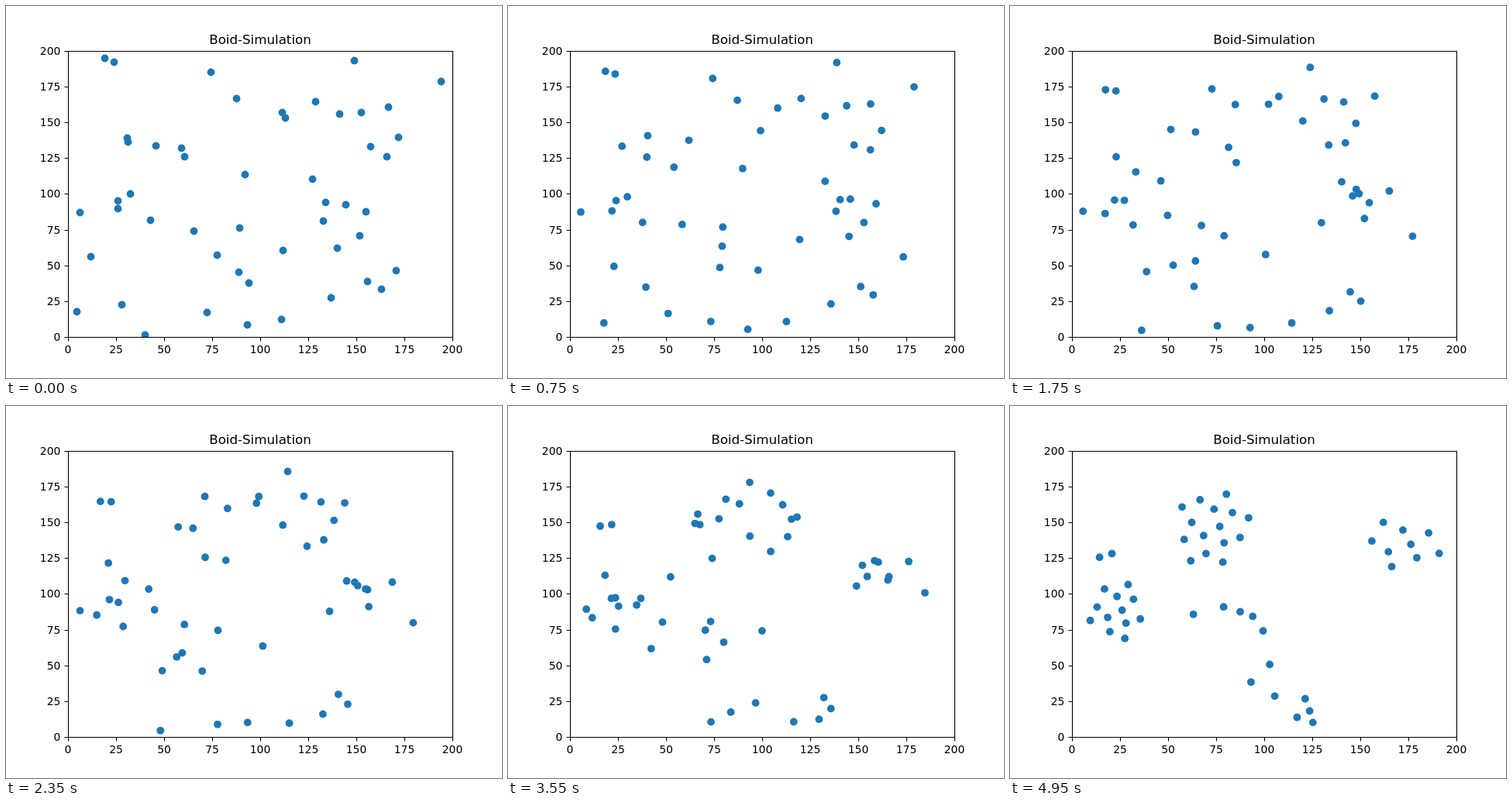
Animation of 640 by 480 pixels, one loop 5000 ms. Source, as an HTML page:

```html
<!DOCTYPE html>
<html lang="en">
<head>
<meta charset="utf-8">
<title>Boid-Simulation</title>
<style>
  html, body { margin: 0; width: 100%; height: 100%; overflow: hidden; background: #fff; }
  svg { display: block; width: 640px; height: 480px; }
  text { font: 13.89px "DejaVu Sans", sans-serif; text-anchor: middle; }
  .title { font-size: 16.67px; }
  .y { text-anchor: end; }
  path { fill: none; stroke: #000; stroke-width: 1.11; }
</style>
</head>
<body>
<svg viewBox="0 0 640 480">
  <clipPath id="plot"><rect x="80" y="57.6" width="496" height="369.6"/></clipPath>
  <g id="boids" clip-path="url(#plot)" fill="#1f77b4"></g>
  <path d="M80.5 58.5H576.5V427.5H80.5Z"/>
  <g id="axes"></g>
  <text class="title" x="328" y="49">Boid-Simulation</text>
</svg>
<script>
const LOOP = 5000, STEP = 50, GOLDEN_ANGLE = Math.PI * (3 - Math.sqrt(5));

// Each flock gathers from scattered starts into an evenly filled ellipse (goal, radius),
// while its centre follows a curve that bends away from the straight line.
const flocks = [
  { goal: [124, 190], radius: [14, 8], bend: [0, -5],
    starts: [[139, 72], [127, 67]] },
  { goal: [136, 263], radius: [40, 39], bend: [-8, 1],
    starts: [[160, 242], [193, 180], [144, 251], [230, 194], [95, 266], [360, 144],
             [186, 276], [156, 170], [301, 286], [144, 261], [242, 290], [300, 343]] },
  { goal: [261, 155], radius: [50, 55], bend: [11, -10],
    starts: [[157, 175], [297, 119], [356, 137], [561, 97], [226, 183], [493, 130],
             [430, 139], [449, 70], [491, 194], [264, 85], [458, 137], [470, 181],
             [399, 123], [506, 169], [308, 217]] },
  { goal: [504, 178], radius: [54, 35], bend: [-2, 10],
    starts: [[427, 312], [357, 315], [409, 277], [412, 253], [438, 256], [464, 265],
             [395, 223], [456, 296], [503, 341]] },
  { goal: [270, 265], radius: [75, 8], bend: [18, -7],
    starts: [[179, 424], [272, 321], [149, 385], [313, 357]] },
  { goal: [324, 333], radius: [30, 55], bend: [-11, 34],
    starts: [[311, 411], [259, 395], [109, 323], [91, 394]] },
  { goal: [379, 393], radius: [20, 20], bend: [3, 6],
    starts: [[484, 365], [355, 404], [466, 355], [419, 376]] },
];

function add(parent, tag, attributes, text = "") {
  const node = document.createElementNS("http://www.w3.org/2000/svg", tag);
  for (const name in attributes) node.setAttribute(name, attributes[name]);
  node.textContent = text;
  return parent.appendChild(node);
}

const axes = document.getElementById("axes");
for (let k = 0; k <= 8; k++) {
  const x = 80 + 62 * k, y = Math.round(427.2 - 46.2 * k);
  add(axes, "path", { d: `M${x + 0.5} 427.5v5M80.5 ${y + 0.5}h-5` });
  add(axes, "text", { x, y: 448 }, 25 * k);
  add(axes, "text", { x: 70.3, y: y + 5, class: "y" }, 25 * k);
}

const layer = document.getElementById("boids");
const boids = flocks.flatMap(({ goal, radius, bend, starts }) =>
  starts.map((start, i) => {
    const r = Math.sqrt((i + 0.5) / starts.length), angle = GOLDEN_ANGLE * i;
    const end = [
      goal[0] + radius[0] * r * Math.cos(angle),
      goal[1] + radius[1] * r * Math.sin(angle),
    ];
    return { dot: add(layer, "circle", { r: 4.9 }), start, end, bend };
  }));

function draw(now) {
  const t = Math.floor((now % LOOP) / STEP) * STEP;
  const s = t / (LOOP - STEP), arc = 4 * s * (1 - s);
  for (const { dot, start, end, bend } of boids) {
    const [x, y] = start.map((from, axis) => from + (end[axis] - from) * s + bend[axis] * arc);
    dot.setAttribute("cx", x + 0.5);
    dot.setAttribute("cy", y + 0.5);
  }
}

let origin;
function tick(now) {
  origin ??= now;
  draw(now - origin);
  requestAnimationFrame(tick);
}
draw(0);
requestAnimationFrame(tick);
</script>
</body>
</html>
```
